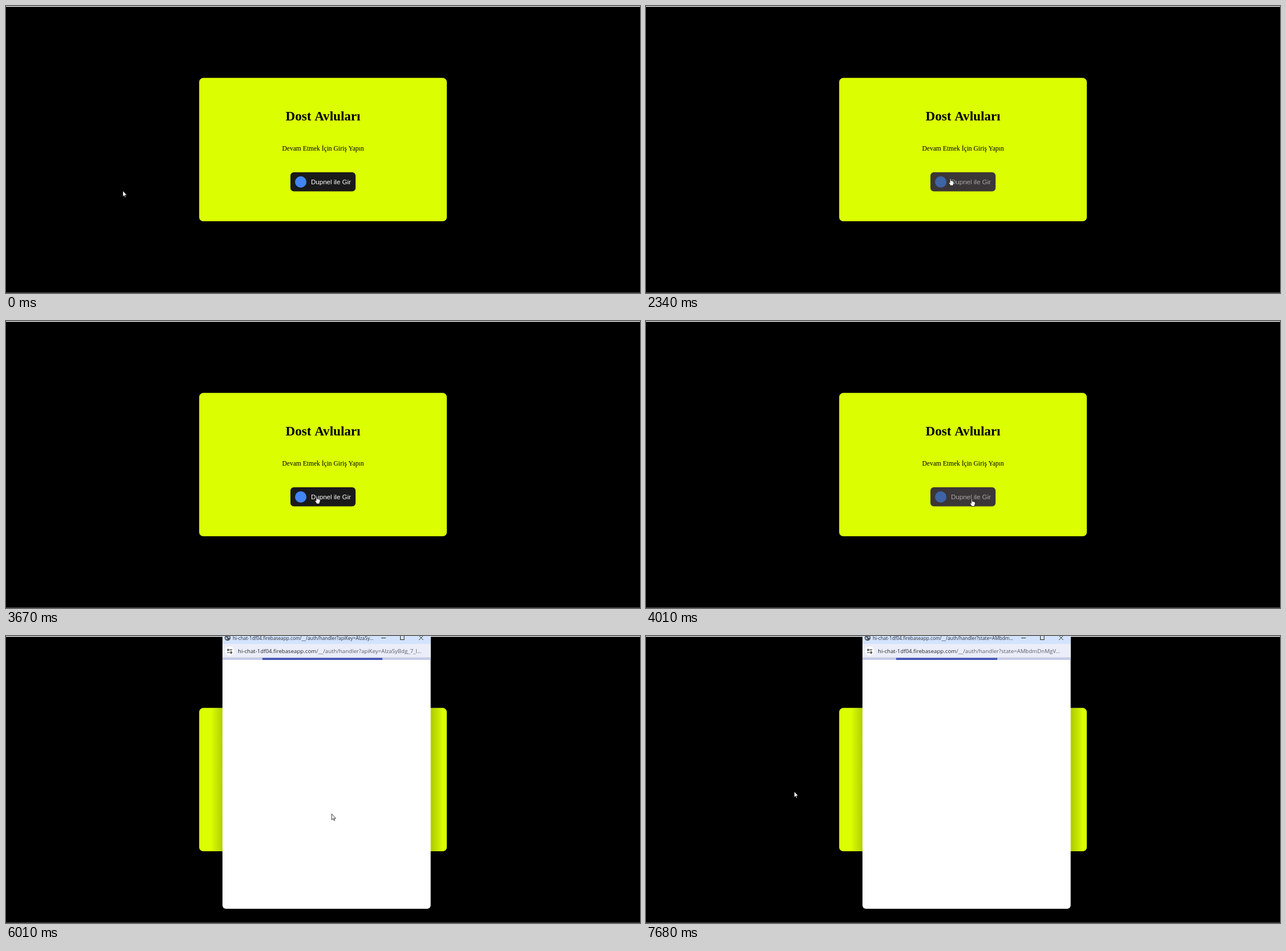
An HTML page with a canvas that plays this animation: 1110x504 px, repeating every 8000 ms.

```html
<!DOCTYPE html>
<html lang="tr">
<head>
<meta charset="utf-8">
<title>Dost Avluları</title>
<style>
html, body { margin: 0; width: 100%; height: 100%; overflow: hidden; background: #000; }
canvas { display: block; }
</style>
</head>
<body>
<canvas id="stage" width="1110" height="504"></canvas>
<script>
const ctx = document.getElementById('stage').getContext('2d');
const LOOP = 8000, STEP = 334;
const SERIF = '"Liberation Serif", "Times New Roman", serif';
const SANS = '"Liberation Sans", Arial, sans-serif';
const UI = '"Open Sans", "Noto Sans", sans-serif';
const HOST = 'hi-chat-1df04.firebaseapp.com';
const PATH = '/__/auth/handler?';
const BUTTON = { x: 498, y: 292, w: 114, h: 33.5 };
const WIN = { x: 379, w: 364.5, h: 479 };

// Steps at which the popup opens, loads, leaves and returns
const OPEN = 15, LOAD = 16, LEAVE = 19, RETURN = 22;

// Pointer key points: step, x, y, easing power of the way there
const KEYS = [
  [0, 204.5, 324.5], [2, 421.5, 195, 0.7], [3, 732.5, 295, 1], [5, 585, 340, 3.6],
  [7, 533, 302.5, 0.5], [9, 616.5, 325.5, 1], [10, 622.5, 334, 1], [11, 544, 308, 3],
  [12, 570.3, 312.5, 1], [19, 570.3, 312.5, 1], [21, 34.5, 312.5, 0.36], [23, 259.5, 273, 6]
];

function pointerAt(step) {
  const i = Math.max(1, KEYS.findIndex(k => k[0] >= step));
  const [s0, x0, y0] = KEYS[i - 1];
  const [s1, x1, y1, power] = KEYS[i];
  const u = Math.max(0, (step - s0) / (s1 - s0)) ** power;
  return { x: x0 + (x1 - x0) * u, y: y0 + (y1 - y0) * u };
}

const overButton = ({ x, y }) =>
  x > BUTTON.x && x < BUTTON.x + BUTTON.w && y > BUTTON.y && y < BUTTON.y + BUTTON.h;

function rect(x, y, w, h, color) {
  ctx.fillStyle = color;
  ctx.fillRect(x, y, w, h);
}

function round(x, y, w, h, r, color) {
  ctx.fillStyle = color;
  ctx.beginPath();
  ctx.roundRect(x, y, w, h, r);
  ctx.fill();
}

function disc(x, y, r, color) {
  ctx.fillStyle = color;
  ctx.beginPath();
  ctx.arc(x, y, r, 0, 7);
  ctx.fill();
}

function ring(x, y, r, color, width, from = 0, to = Math.PI * 2) {
  ctx.strokeStyle = color;
  ctx.lineWidth = width;
  ctx.beginPath();
  ctx.arc(x, y, r, from, to);
  ctx.stroke();
}

function lines(color, width, ...segs) {
  ctx.strokeStyle = color;
  ctx.lineWidth = width;
  ctx.beginPath();
  for (const [x1, y1, x2, y2] of segs) {
    ctx.moveTo(x1, y1);
    ctx.lineTo(x2, y2);
  }
  ctx.stroke();
}

function text(str, x, y, font, color, align = 'left') {
  ctx.font = font;
  ctx.fillStyle = color;
  ctx.textAlign = align;
  ctx.fillText(str, x, y);
  return x + ctx.measureText(str).width;
}

function drawLogin(hover) {
  const { x, y, w, h } = BUTTON;
  round(338.2, 126.3, 433.6, 251.8, 7.2, '#dbff00');
  text('Dost Avluları', 555, 201, `bold 23.1px ${SERIF}`, '#000', 'center');
  text('Devam Etmek İçin Giriş Yapın', 555, 253.5, `11.56px ${SERIF}`, '#000', 'center');
  round(x, y, w, h, 5.8, hover ? '#3b3637' : '#1a1a1a');
  disc(516, 309, 10, hover ? '#3e64a5' : '#4285f4');
  text('Dupnel ile Gir', 534, 313, `11.56px ${SANS}`, hover ? '#a8a6a7' : '#fff');
}

function shade(from, to, alpha) {
  const g = ctx.createLinearGradient(from, 0, to, 0);
  g.addColorStop(0, 'rgba(0,0,0,0)');
  g.addColorStop(1, `rgba(0,0,0,${alpha})`);
  rect(Math.min(from, to), 126, Math.abs(to - from), 252.5, g);
}

function drawTabIcon(spin) {
  if (spin) {
    ring(388, 4, 4.6, '#2f6fe0', 1.6, spin, spin + 1.6);
    return;
  }
  disc(388, 3, 5.2, '#50555c');
  ctx.fillStyle = '#c9d8f2';
  ctx.beginPath();
  ctx.ellipse(386, 4, 1.2, 2.2, -0.6, 0, 7);
  ctx.ellipse(390, 2, 1.8, 1, 0.5, 0, 7);
  ctx.fill();
}

function drawSiteIcon(info) {
  const ink = '#1f1f1f';
  disc(391.5, 26.5, 8, '#fff');
  if (info) {
    ring(391.5, 26.5, 4.5, ink, 1.3);
    lines(ink, 1.3, [391.5, 26, 391.5, 29.2], [391.5, 23.9, 391.5, 25.2]);
    return;
  }
  lines(ink, 1.2, [391.5, 24.3, 396, 24.3], [387, 29, 391.5, 29]);
  ring(388.9, 24.3, 1.3, ink, 1.2);
  ring(394.2, 29, 1.3, ink, 1.2);
}

function drawPopup(step) {
  const { x, w, h } = WIN;
  const blank = step < LOAD;
  const loading = blank || (step >= LEAVE && step < RETURN);
  const back = step >= RETURN;
  shade(x - 20, x, 0.19);
  shade(x + w + 22, x + w, 0.22);
  round(x, 0, w, h, [0, 0, 6, 6], '#fff');
  rect(x, 0, w, 14, '#d3e3fd');
  rect(x, 14, w, 24, '#ebeef8');
  rect(x, 37.7, w, 1, '#b9bcc9');

  drawTabIcon(loading && 3.1 + (step - OPEN) * 1.3);
  const name = back ? 'state=AMbdm...' : 'apiKey=AIzaSy...';
  const title = blank ? 'Adsız - Dupnel Tarvom' : HOST + PATH + name;
  text(title, 397, 6.5, `8.25px ${UI}`, '#262a33');
  lines('#222', 1, [657, 3.5, 665, 3.5], [723, -0.5, 730.5, 7], [730.5, -0.5, 723, 7]);
  ctx.strokeRect(690.5, -0.5, 6.5, 7);

  drawSiteIcon(blank);
  const font = `9.63px ${UI}`;
  const query = back ? 'state=AMbdmDnMgV...' : 'apiKey=AIzaSyBdg_7_l...';
  const [head, tail] = blank ? ['about:', 'blank'] : [HOST, PATH + query];
  const end = text(head, 406, 30.3, font, blank ? '#565c70' : '#24262b');
  text(tail, end, 30.3, font, blank ? '#24262b' : '#5a5d66');

  // The progress bar reaches four times as far as it starts
  if (!loading && step !== LOAD && step !== LOAD + 1 && step !== RETURN) {
    const s = back ? 59 : 70;
    rect(x, 38.5, w, 3.5, '#c5cae9');
    rect(x + s, 38.5, s * 3, 3.5, '#3f51b5');
  }
}

const ARROW = new Path2D('M0 0V16L3.7 12.6L6.2 18L8.4 17L6 11.9H11Z');
const HAND = new Path2D('M-1.5 1.5Q0 -1 1.5 1.5V7L3 6.4L4.5 7.4L6 7L7.5 8.2L9.2 8.4V14' +
  'L7.5 17V20H-0.8V18L-4.8 12.5Q-5 10.5 -3.2 10.8L-1.5 12.5Z');

function drawPointer({ x, y }, shape) {
  ctx.save();
  ctx.translate(x, y);
  ctx.scale(0.65, 0.65);
  ctx.lineJoin = 'round';
  ctx.lineWidth = 1.3;
  ctx.strokeStyle = '#111';
  ctx.fillStyle = '#fff';
  ctx.fill(shape);
  ctx.stroke(shape);
  ctx.restore();
}

function draw(time) {
  // The screen refreshes in even steps, a few ms early
  const step = Math.floor((time % LOOP + 6) / STEP);
  const popup = step >= OPEN;
  const pointer = pointerAt(step);
  rect(0, 0, 1110, 504, '#000');
  rect(0, 0, 1110, 1.3, '#fff');
  rect(0, 503, 1110, 1, '#55565a');
  // The button reacts half a step after the pointer
  drawLogin(overButton(pointerAt(step - 0.5)));
  if (popup) drawPopup(step);
  drawPointer(pointer, !popup && overButton(pointer) ? HAND : ARROW);
}

let start;
function tick(now) {
  start ??= now;
  draw(now - start);
  requestAnimationFrame(tick);
}
draw(0);
requestAnimationFrame(tick);
</script>
</body>
</html>
```
